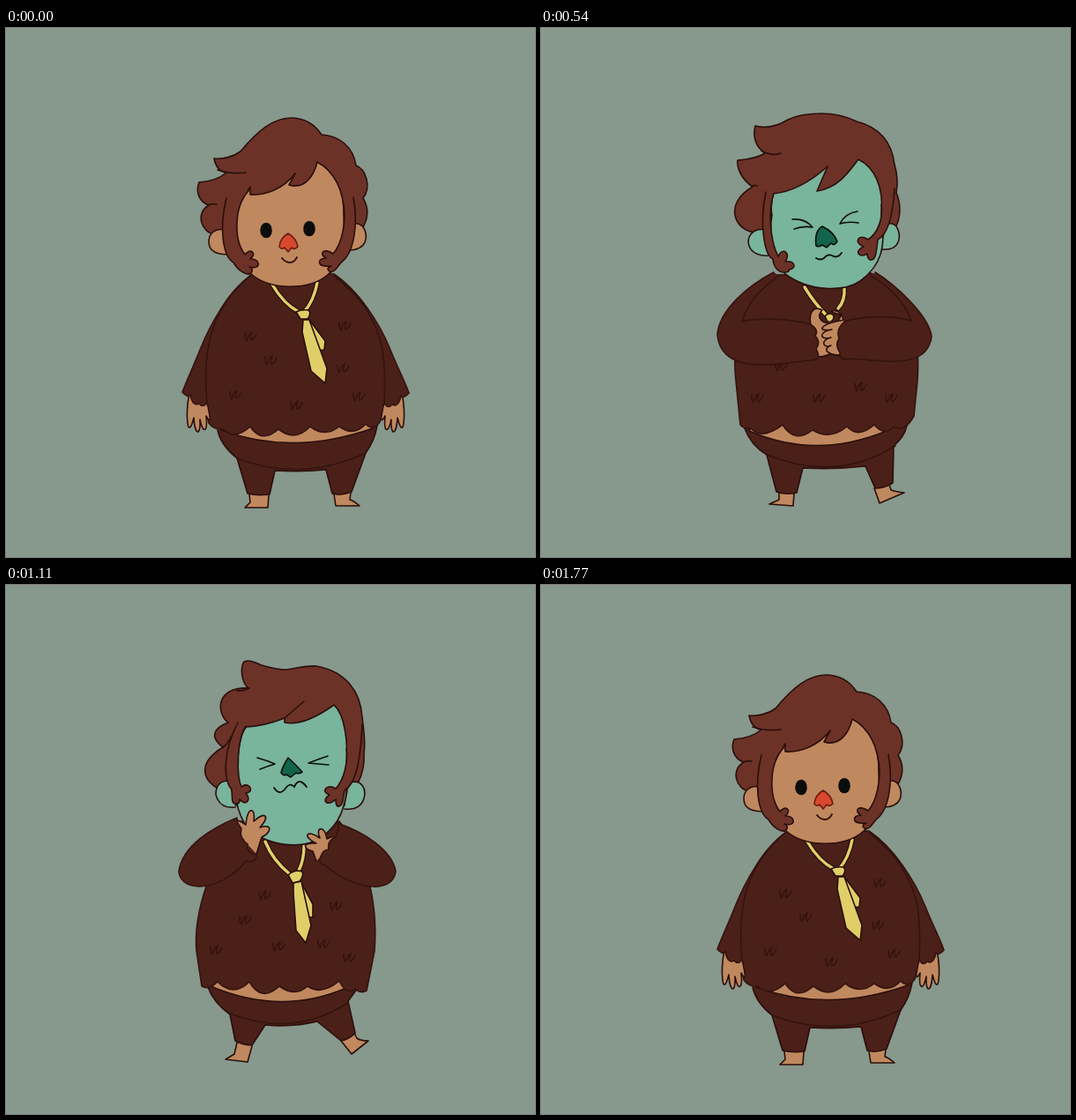
Write an HTML page with a canvas that moves like this. It is 600 px wide and 600 px high and loops after 2160 ms.

```html
<!DOCTYPE html>
<html lang="en">
<head>
<meta charset="utf-8">
<title>Queasy</title>
<style>
html, body { margin: 0; height: 100%; overflow: hidden; background: #87988c; }
canvas { display: block; width: 100vw; height: 100vh; }
</style>
</head>
<body>
<canvas id="stage" width="600" height="600"></canvas>
<script>
const ctx = document.getElementById('stage').getContext('2d');
const BG = '#87988c', COAT = '#4b2019', HAIR = '#6c3227', SKIN = '#c0885e', GREEN = '#79b49d',
  YELLOW = '#e0cf68', LINE = '#2a0f0b', SEAM = '#34130e', INK = '#0a0d0b';
const NUM = /[\d.]+/g;

const flip = (d, sum) => d.replace(/([\d.]+),/g, (_, x) => sum - x + ',');
const mix = (a, b, t) => {
  if (!t) return a;
  const to = b.match(NUM);
  let i = 0;
  return a.replace(NUM, v => (+v + (to[i++] - v) * t).toFixed(2));
};

// Each part holds its outline for: calm, sad, hands clasped, hands at face.
// With three outlines, calm and sad share the first.
const sleeveL = 'C226,405 226,385 229,365 C234,330 252,302 277,281';
const sleeveR = 'C430,405 430,385 427,365 C420,330 402,304 372,281';
const handCalm = 'M208,414 C203,440 206,470 213,442 C214,462 221,464 220,444 C223,460 229,460 227,440 C235,455 230,430 226,420 L224,414';
const handSad = 'M211,424 C205,452 212,462 215,440 C215,462 223,462 222,442 C225,460 230,460 227,438 C235,458 232,435 227,424 L225,420';

const parts = {
  footL: ['M276,529 L277,538 L271,544 L297,544 L298,530', 'M270,527 L270,535 L259,540 L286,542 L287,528', 'M262,519 L259,532 L249,538 L274,541 L279,523'],
  footR: ['M372,529 L374,542 L401,542 Q394,536 390,535 L391,527', 'M378,522 L384,539 L412,527 Q402,526 397,524 L395,518', 'M380,517 L392,532 L411,517 Q402,517 398,514 L395,508'],
  pants: [
    'M240,456 C243,470 252,480 262,488 L274,528 Q285,531 299,529 L305,502 Q335,504 363,501 L370,528 Q380,531 392,526 L408,482 Q418,468 421,451',
    'M231,454 C236,468 246,478 256,484 L267,526 Q278,530 290,527 L297,499 Q333,501 368,497 L379,522 Q390,522 399,516 L400,474 Q412,464 415,451',
    'M229,456 C234,470 244,480 254,487 L260,517 Q269,522 279,522 L294,499 Q325,502 353,495 L380,517 Q390,515 396,508 L388,472 Q394,464 398,458'],
  crease: ['M262,488 Q335,516 408,482', 'M256,484 Q335,516 402,474', 'M254,486 Q325,514 388,474'],
  belly: ['M244,456 Q325,486 416,454 L400,440 L260,440Z', 'M236,457 Q312,490 392,457 L380,440 L250,440Z', 'M232,455 Q312,489 386,457 L370,440 L250,440Z'],
  coat: [
    'M277,281 C230,318 221,370 226,428 L230,448 Q236,456 246,455 Q260,468 277,452 Q290,472 309,455 Q328,470 345,452 Q362,465 378,452 Q395,464 408,449 Q416,458 424,447 L429,430 C436,370 428,320 371,279Z',
    'M268,280 C222,305 217,360 221,400 L226,450 Q230,455 238,454 Q250,468 274,450 Q288,472 308,456 Q328,468 347,452 Q360,466 378,450 Q390,464 400,452 Q412,460 423,440 L427,400 C430,355 424,300 374,278Z',
    'M264,268 C235,310 212,370 216,415 L222,455 Q230,460 240,450 Q258,468 276,450 Q290,474 310,455 Q328,468 342,455 Q358,466 378,449 Q386,466 396,458 Q402,464 409,460 L418,415 C422,360 410,310 378,268Z'],
  tufts: ['277,350 300,377 260,416 329,428 382,386 384,338 400,418', '272,384 272,384 245,420 315,420 362,407 362,407 397,420', '293,352 271,380 238,414 309,410 360,407 374,364 389,423'],
  strap: ['M302,291 Q315,313 332,322 M353,289 Q349,310 338,322', 'M299,294 Q310,312 323,325 M344,294 Q345,310 337,318', 'M294,291 Q303,313 322,328 M338,296 Q338,312 332,324'],
  tail: ['M344,331 L362,355 L361,365 L350,366Z', 'M330,332 L336,350 L336,360 L328,360Z', 'M334,336 L348,362 L348,377 L338,376Z'],
  blade: ['M337,331 L336,345 L346,389 L362,403 L364,386 L344,331Z', 'M325,332 L324,340 L323,355 L328,368 L334,355 L330,332Z', 'M326,338 L326,350 L329,392 L340,406 L346,386 L335,336Z'],
  knot: ['M329,322 Q335,319 343,320 Q347,323 342,330 L334,330Z', 'M322,327 Q326,322 331,325 Q334,329 329,333 L325,333Z', 'M320,329 Q327,322 336,325 Q338,330 333,336 L325,338Z'],
  hair: [
    'M236,148 C246,149 258,146 266,140 C285,117 303,102 323,102 C342,102 352,112 358,121 C378,122 394,135 397,156 C408,160 415,180 405,193 C411,203 411,214 406,224 L390,250 L255,250 L236,234 C222,232 214,210 230,201 C216,196 216,182 219,175 C232,174 242,171 250,164 C242,163 238,158 236,148Z',
    'M236,148 C246,149 258,146 266,140 C285,117 303,102 323,102 C342,102 352,112 358,121 C378,122 402,135 403,165 C404,175 404,185 404,193 C411,203 411,214 406,224 L390,250 L255,250 L236,234 C222,232 214,210 230,201 C216,196 216,182 219,175 C232,174 242,171 250,164 C242,163 238,158 236,148Z',
    'M243,111 C258,115 272,109 280,104 C290,99 305,97 318,97 C335,97 350,102 358,106 C385,113 398,130 401,155 C404,165 405,175 403,187 C408,198 408,212 404,222 L390,250 L255,250 L243,232 C220,230 206,200 240,180 C228,172 222,160 223,150 C238,149 246,147 254,142 C243,135 240,122 243,111Z',
    'M270,87 C278,84 284,89 290,91 C300,94 310,96 318,96 C332,94 342,91 352,92 C385,98 402,120 404,150 C406,165 408,180 406,190 C407,203 404,215 399,225 L390,250 L255,250 L241,231 C228,225 212,205 246,184 C230,172 236,162 252,156 C238,145 238,115 275,117 C266,110 266,92 270,87Z'],
  strands: ['M240,161 Q255,166 272,164 M229,201 Q234,199 239,200 M328,165 Q324,170 321,178', 'M250,139 Q262,146 272,142 M239,180 Q242,178 245,179 M325,157 Q325,157 325,157', 'M262,120 Q270,120 276,117 M246,184 Q252,180 255,172 M338,132 Q325,143 316,151'],
  earL: ['M250,229 C232,226 228,238 231,248 C234,256 247,258 256,256', 'M255,229 C239,226 233,238 236,247 C239,256 250,259 258,258', 'M252,222 C238,222 236,236 240,243 C244,251 252,253 260,252'],
  earR: ['M394,222 C408,220 410,236 407,243 C404,250 396,252 388,252', 'M394,222 C406,220 408,236 405,243 C402,251 394,252 384,251', 'M390,224 C404,220 409,232 406,242 C403,252 394,255 384,254'],
  face: [
    'M277,189 C295,190 315,182 328,165 L321,178 C340,184 350,165 353,152 C372,162 384,185 383,212 C385,245 380,270 366,279 C345,298 300,298 278,279 C262,262 258,235 262,212 C264,200 270,190 277,180Z',
    'M263,188 C285,186 305,175 325,157 L313,185 C338,181 350,162 360,149 C378,158 389,180 386,210 C392,250 385,270 362,287 C345,299 305,300 277,279 C262,262 258,235 262,212 C260,205 262,195 263,188Z',
    'M273,161 C290,160 303,156 316,151 L316,156 C335,160 358,146 372,136 C385,148 388,180 386,205 C389,240 382,265 366,279 C348,300 308,300 276,279 C262,260 255,235 263,195 C264,180 268,165 273,161Z'],
  burnL: [
    'M250,193 C242,225 245,258 258,266 C264,276 272,280 277,279 C281,275 279,272 276,271 C290,275 289,261 277,262 C286,255 276,249 271,257 C258,240 258,200 277,183',
    'M255,186 C247,225 254,258 263,262 C264,274 272,278 277,277 C281,277 282,275 281,274 C290,274 289,263 277,265 C284,256 274,247 269,259 C259,240 258,205 264,188',
    'M263,156 C245,190 247,222 256,232 C257,242 255,248 261,248 C264,249 265,246 265,243 C272,252 279,243 272,236 C284,234 274,222 267,229 C261,215 262,175 272,160'],
  burnR: [
    'M394,192 C400,225 394,256 380,266 C374,274 371,278 367,276 C363,273 366,271 369,270 C352,272 352,261 363,261 C354,256 360,249 371,256 C381,245 386,220 383,200',
    'M401,182 C399,215 392,235 382,240 C380,255 380,262 375,263 C371,264 370,258 370,256 C361,262 354,253 366,248 C354,244 360,232 371,240 C383,232 388,215 386,200',
    'M404,158 C402,200 397,225 384,233 C382,245 382,250 378,251 C374,252 374,246 374,243 C366,252 356,245 367,238 C356,235 364,224 374,231 C384,220 388,200 386,185'],
  eyes: [
    'M289,229 C290,219 301,219 301,230 C301,240 289,240 289,229 M338,228 C338,217 350,217 350,228 C350,238 338,238 338,228',
    'M289,229 C293,228 298,227 300,224 C304,240 288,240 289,229 M337,224 C340,225 345,228 350,229 C350,241 334,241 337,224',
    'M285,217 Q300,216 308,226 Q297,224 287,228 M359,208 Q345,210 339,222 Q348,219 360,221',
    'M285,196 Q296,199 305,203 Q295,206 288,209 M365,194 Q353,198 343,202 Q354,203 366,204'],
  nose: [
    'M310,248 Q311,238 320,233 Q329,238 331,248 Q327,252 324,249 L320,254 L316,249 Q312,252 310,248Z',
    'M312,247 Q310,230 319,225 Q332,231 336,242 Q333,248 329,244 L324,249 L319,246 Q315,249 312,247Z',
    'M312,213 Q314,205 320,196 Q328,203 336,212 Q332,215 329,213 L323,218 L318,215 Q315,217 312,213Z'],
  mouth: [
    'M313,261 Q317,266 322,266 Q327,266 330,260 Q330,260 330,260',
    'M316,266 Q318,262 321,262 Q324,260 326,263 Q329,263 330,265',
    'M312,261 Q317,264 321,261 Q325,256 330,258 Q336,262 341,255',
    'M304,230 Q310,239 316,232 Q322,223 327,229 Q332,217 341,229'],
  handL: [handCalm, handSad,
    'M308,345 C300,318 312,316 319,320 C306,334 336,342 340,326 C338,324 332,324 329,321 C352,315 352,376 310,373 L308,360',
    'M270,290 C250,264 258,262 272,272 C274,248 284,254 281,268 C294,256 300,262 288,275 C304,270 300,282 290,286 L284,305'],
  handR: [flip(handCalm, 657), flip(handSad, 657),
    'M344,331 C315,336 312,345 330,342 C314,344 316,355 329,351 C316,354 320,364 329,360 C318,364 325,372 344,371 L346,360',
    'M366,300 C378,284 372,284 364,288 C362,272 350,274 356,287 C340,276 336,286 352,293 C332,292 340,300 348,302 L352,313'],
  armL: [
    'M277,281 C252,300 232,335 220,365 C212,385 205,400 200,413 Q206,420 209,416 Q212,430 219,426 Q224,432 228,424 ' + sleeveL,
    'M275,281 C247,295 230,335 222,365 C215,390 211,410 208,426 Q212,432 215,427 Q218,434 222,430 Q226,434 229,426 ' + sleeveL,
    'M264,277 C235,292 202,320 200,348 C204,390 255,384 303,377 Q320,378 312,364 Q318,356 311,349 Q316,342 305,336 C285,330 250,328 228,333 C235,310 250,295 270,281',
    'M262,264 C235,275 200,295 196,325 C198,350 245,348 272,313 Q284,316 284,306 Q272,304 274,294 Q264,288 267,276 C262,270 262,268 262,266 C262,265 262,265 262,264'],
  armR: [
    'M372,279 C400,298 424,335 436,365 C444,385 452,400 457,414 Q451,421 448,417 Q445,431 438,427 Q433,433 429,425 ' + sleeveR,
    'M374,279 C404,293 427,335 436,365 C443,390 448,410 449,426 Q445,432 442,427 Q439,434 435,430 Q431,434 429,426 ' + sleeveR,
    'M379,277 C400,290 440,325 443,350 C438,388 390,377 350,375 Q338,378 339,368 Q333,360 338,352 Q334,342 344,333 C365,326 400,326 420,332 C412,310 395,293 374,281',
    'M376,270 C405,280 438,300 442,325 C438,352 395,345 362,318 Q352,316 358,306 Q360,300 366,300 Q364,290 374,286 C376,282 377,278 377,274 C377,272 376,271 376,270']
};

// Start time in ms, position along the four poses.
const steps = [[0, 0], [90, .3], [180, .65], [270, 1], [330, 1.25], [390, 1.6], [480, 1.88], [540, 2],
  [630, 2.3], [690, 2.7], [750, 3], [810, 2.93], [870, 3], [930, 2.93], [990, 3], [1050, 2.93], [1110, 3],
  [1170, 2.93], [1230, 2.7], [1290, 2.3], [1380, 2], [1470, 1.88], [1530, 1.6], [1590, 1.25], [1650, 1],
  [1710, .5], [1770, 0]];

function shape(name, pose) {
  let list = parts[name];
  if (list.length < 4) list = [list[0], ...list];
  const i = Math.min(Math.floor(pose), 2);
  return mix(list[i], list[i + 1], pose - i);
}

function paint(d, fill, line, width = 1.6) {
  const path = new Path2D(d);
  if (fill) { ctx.fillStyle = fill; ctx.fill(path); }
  if (line) { ctx.strokeStyle = line; ctx.lineWidth = width; ctx.stroke(path); }
}

// Skin with the green tide rising over it
function paintHead(d, rise) {
  paint(d, SKIN);
  ctx.save();
  ctx.clip(new Path2D(d));
  ctx.translate(0, rise);
  paint('M200,212 L262,212 Q268,230 282,218 Q290,229 300,222 Q318,228 322,203 Q340,204 346,194 Q360,200 366,186 Q372,170 384,168 L420,168 L420,700 L200,700Z', GREEN);
  ctx.restore();
  paint(d, null, LINE);
}

function draw(pose) {
  const part = (name, ...style) => paint(shape(name, pose), ...style);
  const rise = (1 - pose) * 130;
  ctx.fillStyle = BG;
  ctx.fillRect(0, 0, 600, 600);
  part('footL', SKIN, LINE);
  part('footR', SKIN, LINE);
  part('pants', COAT, LINE);
  part('crease', null, SEAM);
  part('belly', SKIN, LINE);
  part('coat', COAT, SEAM);
  paint(shape('tufts', pose).replace(/([\d.]+),([\d.]+)/g, 'M$1,$2m-6,-4q0,7 2,9q2,-8 6,-10q-3,9 0,9q3,-2 5,-7'), null, SEAM);
  part('strap', null, LINE, 6);
  part('strap', null, YELLOW, 3.4);
  for (const name of ['tail', 'blade', 'knot']) part(name, YELLOW, LINE);

  part('hair', HAIR, LINE);
  part('strands', null, LINE);
  for (const name of ['earL', 'earR', 'face']) paintHead(shape(name, pose), rise);
  part('burnL', HAIR, LINE);
  part('burnR', HAIR, LINE);
  const open = pose < 1.5;
  const look = pose > 1 && pose < 2 ? (open ? 1 : 2) : pose;
  paint(shape('eyes', look), open && INK, INK);
  part('nose', pose > .4 ? '#12644a' : '#d8482e', pose > .4 ? INK : '#6b1c12');
  part('mouth', null, pose > .4 ? INK : LINE, 1.8);

  for (const side of ['L', 'R']) part('hand' + side, SKIN, LINE);
  for (const side of ['L', 'R']) part('arm' + side, COAT, SEAM);
}

ctx.lineJoin = ctx.lineCap = 'round';
function frame(now) {
  const t = now % 2160;
  draw(steps.findLast(step => step[0] <= t)[1]);
  requestAnimationFrame(frame);
}
frame(performance.now());
</script>
</body>
</html>
```
